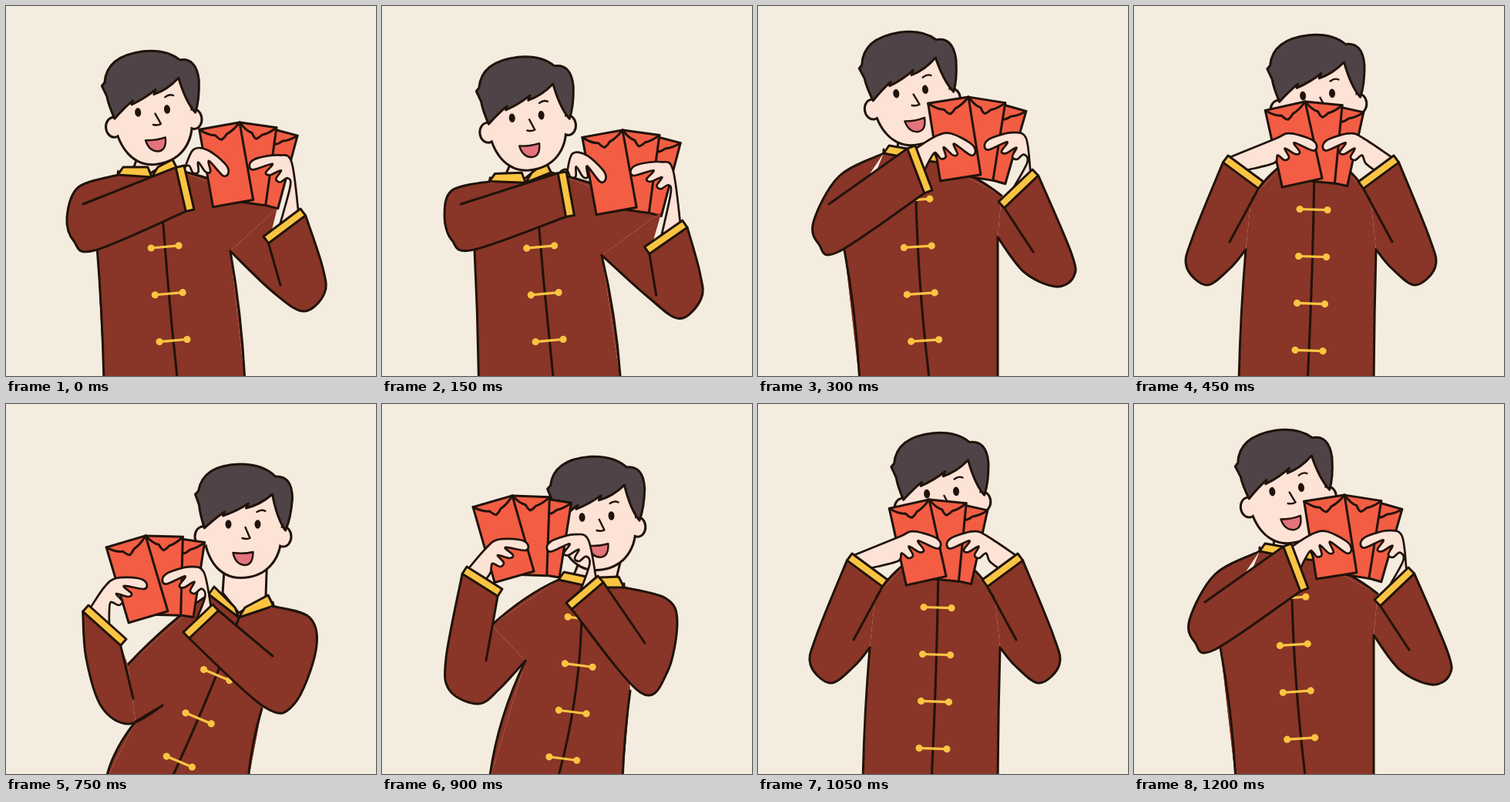
An HTML page with a canvas for the animation above (1350 ms loop, 480 by 480 pixels).

```html
<!DOCTYPE html>
<html lang="en">
<head>
<meta charset="utf-8">
<title>Red envelopes</title>
<style>
html, body { margin: 0; width: 100%; height: 100%; overflow: hidden; background: #f4ecdf; }
canvas { display: block; width: 480px; height: 480px; }
</style>
</head>
<body>
<canvas id="stage" width="480" height="480"></canvas>
<script>
const ctx = document.getElementById('stage').getContext('2d');
const INK = '#20130a', SKIN = '#fde2d6', HAIR = '#4f4347', RED = '#f25d44',
  CLOTH = '#893527', GOLD = '#fac443', PAPER = '#f4ecdf', LIP = '#e4737c';
const STEP = 150, LINE = 3, HEM = 490;

// An arm: cuff edge (outer, inner end), elbow outline, end of the sleeve fold,
// armpit, shoulder and hand. A crossing arm lies over the chest.
function arm(cross, cuff, bend, fold, pit, top, hand) {
  return { cross, cuff, bend, fold, pit, top, hand };
}

// head, fan and hand: x, y, degrees. seam: top x, top y, bow x, bottom x.
const rightLow = {
  head: [190, 135, -6], fan: [303, 151, -10],
  collar: [[145, 219], [189, 222], [223, 213]],
  seam: [200, 222, 208, 223], lastKnot: 434, hem: [127, 310],
  left: arm(true, [[231, 207], [244, 264]], [[94, 235], [79, 275], [88, 305], [115, 317]],
    [100, 257], [118, 312], [146, 219], [257, 201, 38]),
  right: arm(false, [[382, 263], [334, 299]], [[411, 340], [413, 373], [386, 396], [345, 370]],
    [356, 362], [291, 318], [352, 262], [351, 208, -8])
};
const rightHigh = {
  head: [198, 110, -8], fan: [273, 118, -9],
  collar: [[163, 191], [198, 198], [235, 203]],
  seam: [204, 200, 205, 223], lastKnot: 434, hem: [132, 311],
  left: arm(true, [[204, 181], [226, 239]], [[105, 221], [72, 280], [79, 309], [104, 319]],
    [92, 257], [112, 316], [163, 191], [248, 180, 26]),
  right: arm(false, [[356, 212], [312, 254]], [[407, 322], [409, 352], [386, 364], [345, 345]],
    [357, 319], [311, 300], [316, 246], [329, 179, -14])
};
const leftHigh = {
  head: [278.5, 145, -3], fan: [169, 119, -16],
  collar: [[229, 228], [275, 238], [314, 238]],
  seam: [259, 238, 262, 227], lastKnot: 460, hem: [139, 312],
  left: arm(false, [[110, 211], [156, 240]], [[83, 330], [88, 372], [125, 389], [152, 370]],
    [135, 333], [186, 333], [142, 287], [155, 190, 0]),
  right: arm(true, [[280, 223], [239, 258]], [[368, 252], [383, 282], [370, 348], [335, 374]],
    [341, 310], [322, 372], [314, 238], [249, 184, -14])
};
const leftLow = {
  head: [307.5, 155, 0], fan: [181, 171, -16.5],
  collar: [[263, 247], [302, 277], [347, 262]],
  seam: [302, 278, 262, 213], lastKnot: 464, hem: [129, 314],
  left: arm(false, [[107, 261], [156, 305]], [[104, 330], [124, 393], [160, 415], [203, 391]],
    [165, 382], [168, 412], [158, 338], [148, 240, 0]),
  right: arm(true, [[268, 260], [230, 296]], [[394, 277], [402, 320], [374, 389], [335, 393]],
    [346, 327], [332, 395], [345, 262], [238, 226, -14])
};

const raised = arm(false, [[122, 194], [168, 228]], [[76, 300], [68, 338], [94, 362], [125, 340]],
  [124, 306], [145, 316], [152, 250], [202, 180, 14]);
const middle = {
  head: [238, 114, -5], fan: [222, 124, -12.5],
  collar: [[196, 204], [235, 212], [270, 207]],
  seam: [234, 212, 232, 225], lastKnot: 447, hem: [136, 311],
  left: raised, right: { ...mirror(raised, 459), hand: [280, 180, -14] }
};

function mirror(v, axis) {
  if (!Array.isArray(v)) {
    if (typeof v !== 'object') return v;
    return Object.fromEntries(Object.entries(v).map(([k, x]) => [k, mirror(x, axis)]));
  }
  return Array.isArray(v[0]) ? v.map(p => mirror(p, axis)) : [axis - v[0], ...v.slice(1)];
}

function mix(a, b, t) {
  if (typeof a === 'number') return a + (b - a) * t;
  if (Array.isArray(a)) return a.map((v, i) => mix(v, b[i], t));
  if (typeof a !== 'object') return a;
  return Object.fromEntries(Object.keys(a).map(k => [k, mix(a[k], b[k], t)]));
}

const rightDip = mix(rightLow, rightHigh, -0.3);
const cycle = [rightLow, rightDip, rightHigh, middle, leftHigh, leftLow, leftHigh, middle, rightHigh];

const hair = new Path2D('M-50 6Q-56 -12 -57 -24L-62 -38L-58 -42Q-52 -76 -4 -77Q26 -77 42 -61' +
  'Q64 -62 64 -32Q62 -6 55 9Q44 -6 38 -38Q22 -24 4 -20L7 -26Q-8 -16 -26 -10L-24 -15Q-36 -7 -50 6Z');
const face = new Path2D('M-50 0C-50 45 -30 69 -3 69C28 69 46 48 48 20L50 -5L40 -40L-40 -40Z');
const fingers = [[-20, -3], [-5, -14], [23, -14], [34, -8], [31, 0], [5, -4], [15, 6], [10, 10],
  [-5, 6], [3, 16], [-2, 21], [-12, 17], [-14, 28]];

const add = (p, x, y) => [p[0] + x, p[1] + y];

function locate([x, y, deg], [px, py]) {
  const r = deg * Math.PI / 180, c = Math.cos(r), s = Math.sin(r);
  return [x + px * c - py * s, y + px * s + py * c];
}

// Smooth line through the points (Catmull-Rom)
function curve(p) {
  const path = new Path2D(), last = p.length - 1;
  path.moveTo(...p[0]);
  for (let i = 0; i < last; i++) {
    const a = p[Math.max(0, i - 1)], b = p[i], c = p[i + 1], d = p[Math.min(last, i + 2)];
    path.bezierCurveTo(b[0] + (c[0] - a[0]) / 6, b[1] + (c[1] - a[1]) / 6,
      c[0] - (d[0] - b[0]) / 6, c[1] - (d[1] - b[1]) / 6, ...c);
  }
  return path;
}

function poly(points, closed) {
  const path = new Path2D();
  points.forEach(p => path.lineTo(...p));
  if (closed) path.closePath();
  return path;
}

function oval(x, y, rx, ry) {
  const path = new Path2D();
  path.ellipse(x, y, rx, ry, 0, 0, Math.PI * 2);
  return path;
}

function paint(path, fill, width = LINE, ink = INK) {
  if (fill) { ctx.fillStyle = fill; ctx.fill(path); }
  if (width) { ctx.strokeStyle = ink; ctx.lineWidth = width; ctx.stroke(path); }
}

function placed([x, y, deg], draw) {
  ctx.save();
  ctx.translate(x, y);
  ctx.rotate(deg * Math.PI / 180);
  draw();
  ctx.restore();
}

function drawHead() {
  const skin = [oval(-52, 17, 9, 11.5), oval(52, 17, 9, 11.5), face];
  skin.forEach(s => paint(s, null, LINE * 2));
  skin.forEach(s => paint(s, SKIN, 0));
  paint(hair, HAIR);
  for (const x of [-19, 19]) paint(oval(x, 1, 4, 5.8), INK, 0);
  paint(new Path2D('M18 -15Q24 -19 29 -16'), null, 2.4);
  paint(new Path2D('M3 5L9 19Q5 21 -1 19'), null, 2.4);
  paint(new Path2D('M-13 38Q1 40 13 37Q13 54 2 54Q-10 53 -13 38Z'), LIP, 2.4);
}

function drawPack(w, h) {
  paint(poly([[-w, 0], [0, 0], [0, h], [-w, h]], true), RED);
  const flap = new Path2D();
  flap.moveTo(-w, 0);
  flap.quadraticCurveTo(-w * 0.8, 10, -w * 0.64, 11);
  flap.quadraticCurveTo(-w * 0.55, 18, -w * 0.5, 18);
  flap.quadraticCurveTo(-w * 0.42, 16, -w * 0.36, 12);
  flap.quadraticCurveTo(-w * 0.18, 9, 0, 0);
  paint(flap);
}

function drawFan() {
  placed([71, 30, 25], () => drawPack(48, 98));
  placed([46, 15, 18], () => drawPack(48, 102));
  drawPack(53, 102);
}

function drawTorso(p) {
  const { left, right, collar: [l, c, r], hem } = p;
  const sides = [[left.pit, hem[0]], [right.pit, hem[1]]].map(([[x, y], end]) => {
    const side = new Path2D();
    side.moveTo(x, y);
    side.quadraticCurveTo(x + (end - x) * 0.8, (y + HEM) / 2, end, HEM);
    return side;
  });
  const shoulders = [[l, left.top], [r, right.top]].map(([a, b]) => {
    const line = new Path2D();
    line.moveTo(...a);
    line.quadraticCurveTo((a[0] + b[0]) / 2, (a[1] + b[1]) / 2 - 10, ...b);
    return line;
  });
  paint(poly([[hem[0], HEM], left.pit, left.top, l, c, r, right.top, right.pit, [hem[1], HEM]]), CLOTH, 0);
  [...sides, ...shoulders].forEach(s => paint(s, CLOTH));
}

// Seam with knots set square to it, one every 61 px
function drawSeam({ seam: [x0, y0, bow, x1], lastKnot }) {
  const line = new Path2D();
  line.moveTo(x0, y0);
  line.quadraticCurveTo(bow, (y0 + HEM) / 2, x1, HEM);
  paint(line);
  const tilt = Math.atan2(x0 - x1, HEM - y0);
  for (let i = 0; i < 4; i++) {
    const y = lastKnot - i * 61 * Math.cos(tilt), t = (y - y0) / (HEM - y0), u = 1 - t;
    const x = u * u * x0 + 2 * u * t * bow + t * t * x1;
    placed([x, y, tilt * 180 / Math.PI], () => {
      paint(poly([[-18, 0], [18, 0]]), null, 3.2, GOLD);
      for (const k of [-18, 18]) paint(oval(k, 0, 4.6, 4.6), GOLD, 0);
    });
  }
}

function drawCollar({ head, collar: [l, c, r] }) {
  paint(poly([locate(head, [-24, 55]), add(l, 18, -2), add(c, 0, -6),
    add(r, -10, -12), locate(head, [31, 50])]), SKIN);
  paint(poly([l, add(l, 7, -10), add(c, -5, -13), c], true), GOLD);
  paint(poly([c, add(c, 8, -13), add(r, -7, -14), r], true), GOLD);
}

// Sleeve end of the cuff, 11 px behind the hand end
function sleeveEnd([a, b], side) {
  const dx = b[0] - a[0], dy = b[1] - a[1], k = 11 * side / Math.hypot(dx, dy);
  return [add(a, -dy * k, dx * k), add(b, -dy * k, dx * k)];
}

function drawArm({ cross, cuff, bend, fold, pit, top, hand }, side) {
  const [outer, inner] = sleeveEnd(cuff, side);
  const edge = cross ? [top, ...bend, inner] : [outer, ...bend, pit];
  const from = cross ? outer : inner;
  const area = curve(edge);
  if (cross) {
    area.lineTo(...outer);
    area.lineTo(...mix(outer, fold, 0.5));
  } else {
    area.lineTo(...top);
    area.lineTo(...inner);
  }
  const grip = fingers.map(([x, y]) => locate(hand, [x * side, y]));
  paint(area, CLOTH, 0);
  paint(curve(edge));
  paint(poly([from, fold]));
  paint(curve([mix(...cuff, 0.06), ...grip, mix(...cuff, 0.55)]), SKIN, 2.7);
  paint(poly([...cuff, inner, outer], true), GOLD);
}

function drawPose(p) {
  ctx.fillStyle = PAPER;
  ctx.fillRect(0, 0, 480, 480);
  drawTorso(p);
  drawSeam(p);
  drawCollar(p);
  placed(p.head, drawHead);
  placed(p.fan, drawFan);
  drawArm(p.left, 1);
  drawArm(p.right, -1);
}

ctx.lineCap = ctx.lineJoin = 'round';
const start = performance.now();
function tick() {
  const t = Math.max(0, performance.now() - start);
  drawPose(cycle[Math.floor(t / STEP) % cycle.length]);
  requestAnimationFrame(tick);
}
tick();
</script>
</body>
</html>
```
